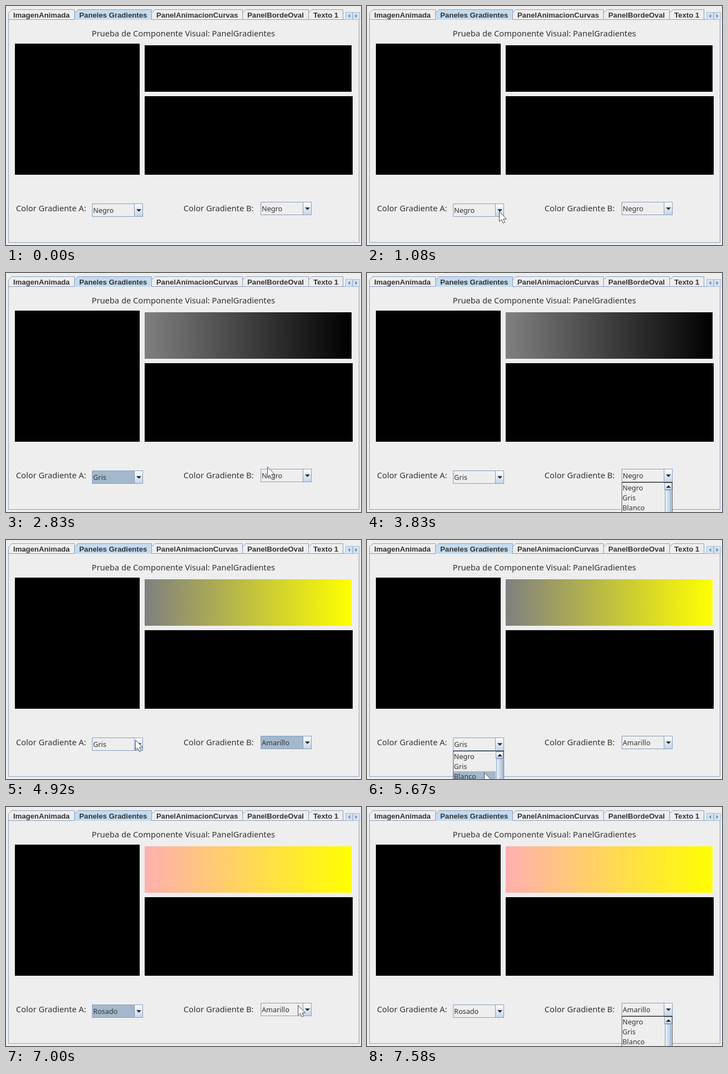
These frames come from a looping animation (640x432 px, 8000 ms). An HTML page with a canvas:

```html
<!DOCTYPE html>
<html lang="es">
<head>
<meta charset="utf-8">
<style>
html, body { margin: 0; width: 640px; height: 432px; overflow: hidden; background: #eee; }
canvas { display: block; }
</style>
</head>
<body>
<canvas id="stage" width="640" height="432"></canvas>
<script>
const c = document.getElementById('stage').getContext('2d');
const BG = '#eeeeee', LINE = '#8a9dbd', FOCUS = '#a3b8cc', TAB = '#c4dcf0', INK = '#333';
const TICKS = 96, TICK = 8000 / TICKS;
const TABS = ['ImagenAnimada', 'Paneles Gradientes', 'PanelAnimacionCurvas', 'PanelBordeOval', 'Texto 1'];
const ITEMS = ['Negro', 'Gris', 'Blanco'];
const COLOURS = { Negro: '#000', Gris: '#808080', Amarillo: '#ff0', Rosado: '#ffafaf' };
const COMBOS = { A: [155, 357], B: [459, 354] };

// Each list is opened and, at the pick tick, closed with a new value
const PICKS = [
  { id: 'A', open: 15, pick: 26, value: 'Gris' },
  { id: 'B', open: 40, pick: 51, value: 'Amarillo' },
  { id: 'A', open: 62, pick: 75, value: 'Rosado' },
  { id: 'B', open: 85, pick: TICKS }
];

// Pointer moves: start tick, end tick, destination
const ENTRY = [493, -22];
const MOVES = [[0, 4, 264, 407], [7, 14, 236, 369], [17, 23, 210, 400], [26, 34, 471, 350],
  [34, 40, 526, 358], [42, 46, 515, 434], [54, 59, 233, 361], [63, 70, 205, 434],
  [75, 84, 526, 358], [86, 91, 510, 434]];

function box(x, y, w, h, fill, stroke) {
  c.fillStyle = fill;
  c.fillRect(x, y, w, h);
  if (stroke) {
    c.strokeStyle = stroke;
    c.strokeRect(x + .5, y + .5, w - 1, h - 1);
  }
}

function poly(points, fill, stroke) {
  c.beginPath();
  points.forEach(p => c.lineTo(...p));
  if (fill) { c.fillStyle = fill; c.fill(); }
  if (stroke) { c.strokeStyle = stroke; c.stroke(); }
}

function text(s, x, y, size, font = '400', family = '"Noto Sans"') {
  c.font = `${font} ${size}px ${family}, sans-serif`;
  c.fillStyle = INK;
  c.fillText(s, x, y);
  return c.measureText(s).width;
}

function shade(x0, y0, x1, y1, from, to) {
  const g = c.createLinearGradient(x0, y0, x1, y1);
  g.addColorStop(0, from);
  g.addColorStop(1, to);
  return g;
}

// Small triangle pointing along (dx, dy)
function arrow(x, y, dx, dy, size, fill) {
  const u = dx * size / 2, v = dy * size / 2;
  poly([[x + u, y + v], [x - u - 2 * v, y - v - 2 * u], [x - u + 2 * v, y - v + 2 * u]], fill);
}

function tabs() {
  box(4, 24, 633, 404, BG, LINE);
  let x = 5;
  TABS.forEach((label, i) => {
    const selected = i === 1;
    const w = Math.round(text(label, x + 8, 21, 13.2, '700', '"Liberation Sans"')) + 17;
    const l = x - .5, r = x + w - .5;
    poly([[l, 24.5], [l, 12.5], [l + 6, 6.5], [r, 6.5], [r, 24.5]], selected ? TAB : BG, LINE);
    poly([[l, 24.5], [r, 24.5]], null, selected ? TAB : LINE);
    text(label, x + 8, 21, 13.2, '700', '"Liberation Sans"');
    x += w;
  });
  [-1, 1].forEach((dir, i) => {
    box(612 + 13 * i, 11, 13, 14, '#d3e3f2', '#a9bdd6');
    arrow(618.5 + 13 * i, 18, dir, 0, 3.5, '#6685b0');
  });
}

function button(x, y, w, h, dir) {
  box(x, y, w, h, shade(0, y, 0, y + h, '#fff', '#c0d4e8'), LINE);
  arrow(x + w / 2 + .5, y + h / 2 + .5, 0, dir, 4.5, '#222');
}

function combo([x, y], value, focused) {
  box(x, y, 92, 24, focused ? FOCUS : BG, LINE);
  button(x + 76, y, 16, 24, 1);
  text(value, x + 2, y + 17, 12.7);
}

function popup([x, comboY], value, pointerY) {
  const y = comboY + 24;
  // The current value stays lit until the pointer enters the list
  const row = Math.floor((pointerY - y - 2) / 18);
  const hot = row < 0 ? ITEMS.indexOf(value) : row;
  box(x, y, 92, 80, BG, '#555c66');
  box(x, y, 92, 1, '#222');
  ITEMS.forEach((s, i) => {
    if (i === hot) box(x + 1, y + 1 + 18 * i, 76, 18, FOCUS);
    text(s, x + 1.5, y + 14.5 + 18 * i, 12.7);
  });
  button(x + 77, y + 1, 14, 13, -1);
  box(x + 78, y + 14, 12, 60, shade(x + 78, 0, x + 90, 0, '#f4f8fc', '#a9c2dd'), LINE);
}

function pointerAt(t) {
  let [x, y] = ENTRY;
  for (const [start, end, toX, toY] of MOVES) {
    const k = Math.min(1, Math.max(0, (t - start) / (end - start)));
    const eased = k * k * (3 - 2 * k);
    x += (toX - x) * eased;
    y += (toY - y) * eased;
  }
  return [Math.round(x), Math.round(y)];
}

function pointer(x, y) {
  c.save();
  c.translate(x + .5, y + .5);
  poly([[0, 0], [0, 18], [4, 14.5], [7, 21], [10, 19.5], [7.3, 13.5], [13, 13.5], [0, 0]], '#fff', '#4a4a4a');
  c.restore();
}

function draw(t) {
  const [mx, my] = pointerAt(t);
  const value = { A: 'Negro', B: 'Negro' };
  let focus, open;
  for (const p of PICKS) {
    if (t >= p.open) { open = p.id; focus = null; }
    if (t >= p.pick) { open = null; focus = p.id; value[p.id] = p.value; }
  }

  box(0, 0, 640, 432, BG);
  tabs();
  text('Prueba de Componente Visual: PanelGradientes', 154.5, 55, 14.7);
  box(16, 68, 225, 237, '#000');
  box(250, 71, 373, 84, shade(250, 0, 623, 0, COLOURS[value.A], COLOURS[value.B]));
  box(250, 163, 375, 142, '#000');

  text('Color Gradiente A:', 18, 371, 14.7);
  text('Color Gradiente B:', 320, 371, 14.7);
  for (const id in COMBOS) combo(COMBOS[id], value[id], focus === id);
  if (open) popup(COMBOS[open], value[open], my);
  pointer(mx, my);
}

function frame() {
  draw(Math.floor((performance.now() + 4) / TICK) % TICKS);
  requestAnimationFrame(frame);
}
frame();
</script>
</body>
</html>
```
